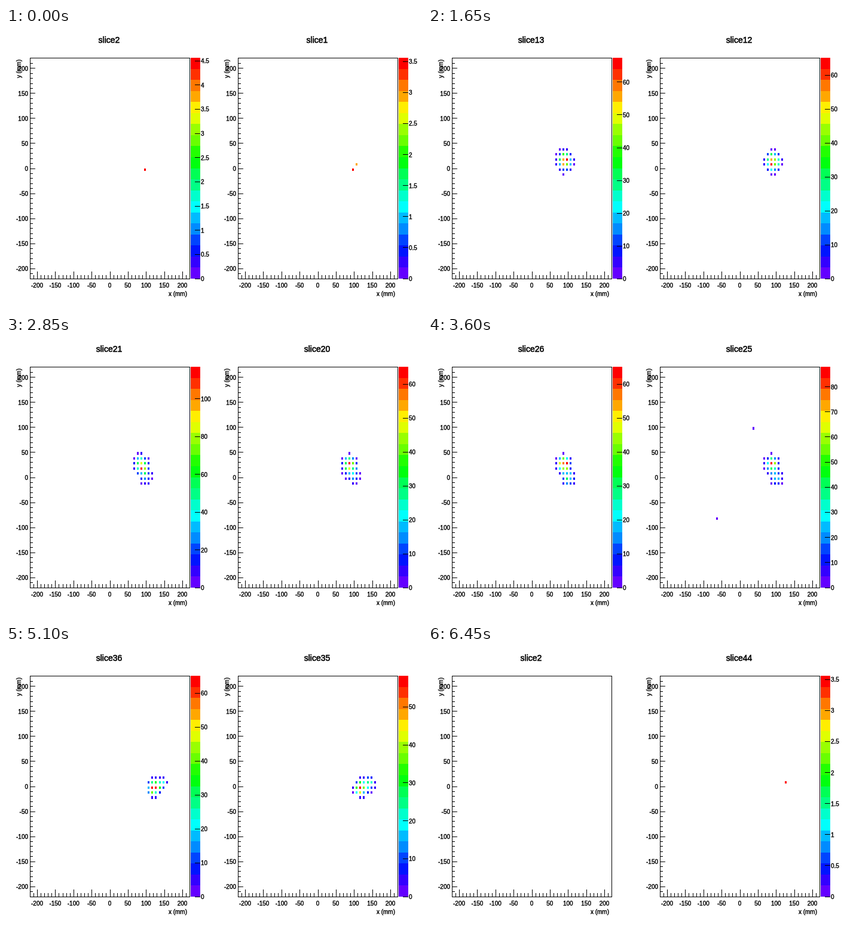
Write an HTML page with a canvas that moves like this. It is 696 by 472 pixels and loops after 6.6 s.

```html
<!DOCTYPE html>
<html lang="en">
<head>
<meta charset="utf-8">
<title>Slices</title>
<style>
  html, body { margin: 0; width: 100%; height: 100%; overflow: hidden; background: #fff; }
  canvas { display: block; }
</style>
</head>
<body>
<canvas id="stage" width="696" height="472"></canvas>
<script>
const ctx = document.getElementById('stage').getContext('2d');
const WIDTH = 696, HEIGHT = 472, PANEL_WIDTH = WIDTH / 2;
const STEP_MS = 150, STEPS = 44;
const RANGE = 220, BANDS = 20, CUTOFF = 0.03;

// Each pad is inset by 1% of the stage; its plot is inset by a further 10%.
const PAD_X = WIDTH * 0.01, PAD_Y = HEIGHT * 0.01;
const PLOT_WIDTH = (PANEL_WIDTH - 2 * PAD_X) * 0.8;
const PLOT_HEIGHT = (HEIGHT - 2 * PAD_Y) * 0.8;
const LEFT = PANEL_WIDTH / 2 - PLOT_WIDTH / 2;
const BOTTOM = HEIGHT / 2 + PLOT_HEIGHT / 2;

const toX = mm => LEFT + PLOT_WIDTH * (mm + RANGE) / (2 * RANGE);
const toY = mm => BOTTOM - PLOT_HEIGHT * (mm + RANGE) / (2 * RANGE);
const pixel = v => Math.floor(v + 1e-6);
const clamp = (v, low, high) => Math.min(high, Math.max(low, v));

// Path of the spot and its companion: slice, x, y, companion x, y, weight
const PATH = [
  [1, 9, -1, 10, 0, 0.81],
  [2, 9, -1, 9, -1, 0],
  [9, 8.6, 0, 9, 0, 0],
  [17, 8, 1.6, 9, -0.2, 0.2],
  [26, 8.1, 1.8, 9.5, -1, 0.35],
  [31, 10.1, -1.2, 13.6, 0, 0.95],
  [39, 12.1, -0.9, 13, -0.5, 0],
  [44, 12, 0, 12, 0, 0]
];
const STRAYS = [[8, 1, 4], [8, 16, 3], [25, 3, 9], [25, -7, -9]];

function noise(a, b, c) {
  const v = Math.sin(a * 12.9898 + b * 78.233 + c * 37.719) * 43758.5453;
  return v - Math.floor(v);
}

function pathAt(slice) {
  const next = Math.max(1, PATH.findIndex(point => point[0] >= slice));
  const a = PATH[next - 1], b = PATH[next];
  const u = (slice - a[0]) / (b[0] - a[0]);
  return a.map((v, i) => v + (b[i] - v) * u);
}

// Rises over the first slices and falls over the last ones
const strength = slice => clamp(Math.min(slice - 1.72, 44.2 - slice) / 4, 0, 1);

// Even slices hold a steady scale, odd ones swing slowly
function scaleMax(slice) {
  const swing = 80 + 38 * Math.cos(2 * Math.PI * (slice - 20) / 23);
  return Math.max(3.55, strength(slice) * (slice % 2 ? swing : 65));
}

function sliceCells(slice) {
  const [, x1, y1, x2, y2, weight] = pathAt(slice);
  const power = strength(slice);
  const spread = 0.25 + power * (0.9 - 0.008 * slice);
  const lobe = (dx, dy) => Math.exp(-(dx * dx + 1.1 * dy * dy) / (2 * spread * spread));
  const cells = [];
  for (let i = 3; i < 19; i++) {
    for (let j = -6; j < 8; j++) {
      const grain = 1 + power * 0.6 * (noise(i, j, slice) - 0.5);
      const value = grain * (lobe(i - x1, j - y1) + weight * lobe(i - x2, j - y2));
      if (value > CUTOFF) cells.push([i, j, value]);
    }
  }
  const peak = Math.max(...cells.map(cell => cell[2]));
  const strays = STRAYS.filter(stray => stray[0] === slice);
  return [
    ...cells.map(([i, j, value]) => [i, j, value / peak]),
    ...strays.map(([, i, j]) => [i, j, 0])
  ];
}

function bandColor(band) {
  const hue = 280 - 5.6 * (Math.floor((band + 0.99) * 2.5) + 1);
  return `hsl(${hue}, 100%, 50%)`;
}

function box(x1, y1, x2, y2, color = '#000') {
  const x = pixel(x1), y = pixel(y1);
  ctx.fillStyle = color;
  ctx.fillRect(x, y, pixel(x2) - x, pixel(y2) - y);
}

function text(str, x, y, align, size = 10, weight = 0.4) {
  ctx.font = `${size}px "Liberation Sans", Arial, sans-serif`;
  ctx.textAlign = align;
  ctx.fillStyle = ctx.strokeStyle = '#000';
  ctx.lineWidth = weight;
  ctx.fillText(str, x, y);
  ctx.strokeText(str, x, y);
}

function drawAxes() {
  ctx.strokeStyle = '#000';
  ctx.lineWidth = 1;
  ctx.strokeRect(40.5, 50.5, 267, 371);
  for (let mm = -RANGE; mm <= RANGE; mm += 10) {
    const major = mm % 50 === 0, x = toX(mm), y = toY(mm);
    box(x, BOTTOM - (major ? 12 : 6), x + 1, BOTTOM);
    box(LEFT, y, LEFT + (major ? 9 : 5), y + 1);
    if (major) {
      text(mm, x - 0.5, 436, 'center');
      text(mm, 37, y + 4, 'right');
    }
  }
  text('x (mm)', 303, 450, 'right');
  ctx.save();
  ctx.translate(25, 53);
  ctx.rotate(-Math.PI / 2);
  text('y (mm)', 0, 0, 'right');
  ctx.restore();
}

function tickStep(max) {
  const base = 10 ** Math.floor(Math.log10(max / 10));
  return [1, 2, 5, 10].map(m => m * base).find(step => max / step <= 10.5);
}

function drawPalette(max) {
  const level = fraction => BOTTOM - PLOT_HEIGHT * fraction;
  for (let band = 0; band < BANDS; band++) {
    box(309, level((band + 1) / BANDS), 325, level(band / BANDS), bandColor(band));
  }
  const step = tickStep(max);
  for (let value = 0; value <= max; value += step) {
    const y = level(value / max);
    box(316, y, 325, y + 1);
    text(+value.toFixed(2), 326, y + 4, 'left');
  }
}

function drawPanel(offset, slice, filled) {
  ctx.save();
  ctx.translate(offset, 0);
  text('slice' + slice, 172.5, 25, 'center', 14, 0.6);
  if (filled) {
    for (const [i, j, value] of sliceCells(slice)) {
      const band = Math.min(BANDS - 1, Math.floor(value * BANDS));
      const x = 10 * i + 5, y = 10 * j + 5;
      box(toX(x), toY(y + 5), toX(x + 5), toY(y), bandColor(band));
    }
    drawPalette(scaleMax(slice));
  }
  drawAxes();
  ctx.restore();
}

function draw(now) {
  const step = Math.floor(now / STEP_MS) % STEPS;
  const filled = step < STEPS - 2;
  box(0, 0, WIDTH, HEIGHT, '#fff');
  drawPanel(0, filled ? step + 2 : 2, filled);
  drawPanel(PANEL_WIDTH, step + 1, true);
}

function loop() {
  draw(performance.now());
  requestAnimationFrame(loop);
}
loop();
</script>
</body>
</html>
```
